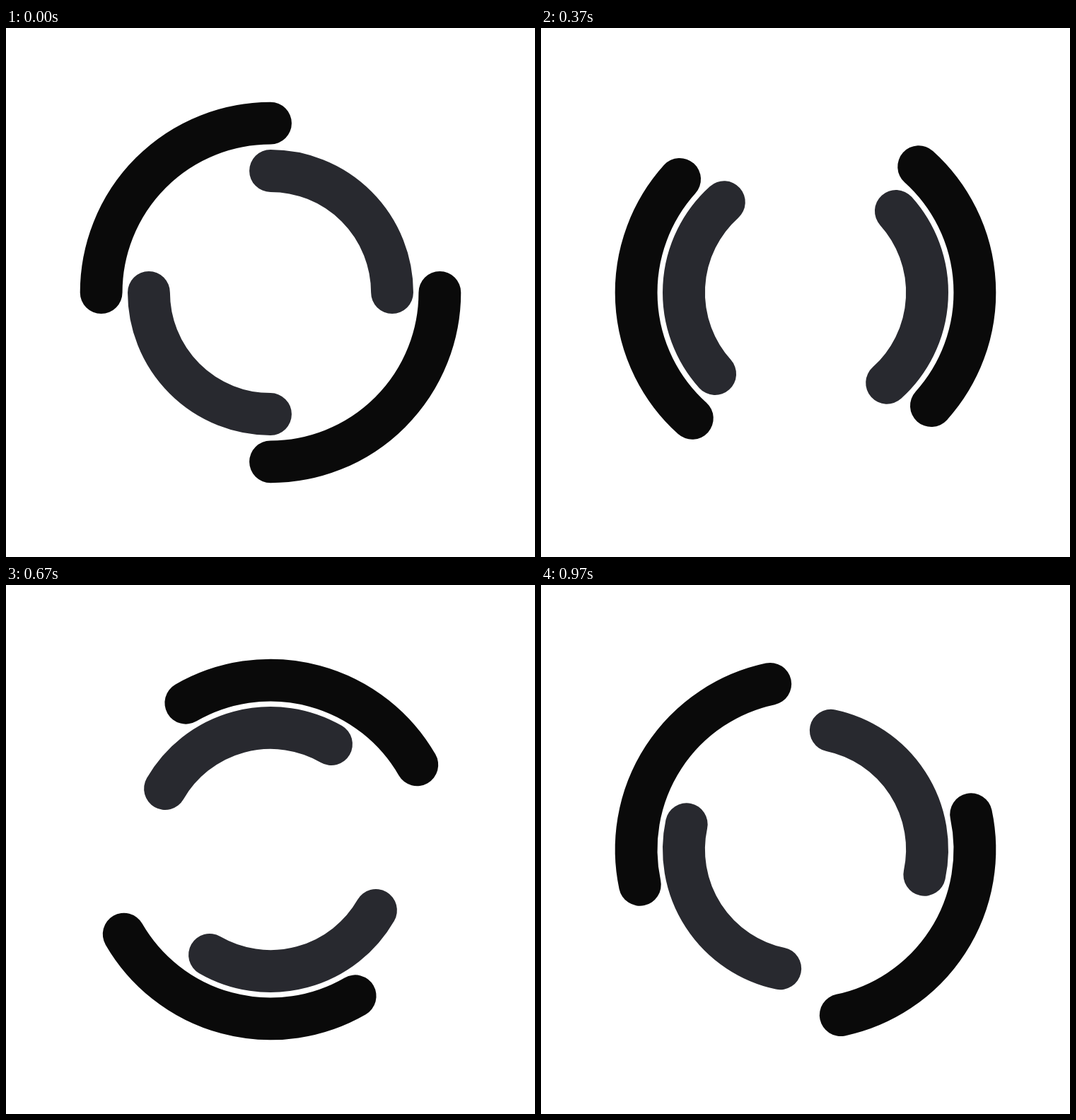
Animation, 748 px wide and 748 px high, one loop 1 s. Source, as an HTML page with a canvas:

```html
<!DOCTYPE html>
<html lang="en">
<head>
<meta charset="utf-8">
<title>Double ring spinner</title>
<style>
  html, body { margin: 0; width: 100%; height: 100%; overflow: hidden; background: #fff; }
  canvas { display: block; width: 748px; height: 748px; }
</style>
</head>
<body>
<canvas id="stage" width="748" height="748"></canvas>
<script>
const SIZE = 748, MID = SIZE / 2, LOOP = 1000, STEPS = 30;
const QUARTER = Math.PI / 2;
const ctx = document.getElementById('stage').getContext('2d');

// Two opposite quarter arcs, beginning at the given angle
function ring(radius, color, start) {
  ctx.strokeStyle = color;
  for (const from of [start, start + Math.PI]) {
    ctx.beginPath();
    ctx.arc(MID, MID, radius, from, from + QUARTER);
    ctx.stroke();
  }
}

// 30 steps per loop, each starting on a whole 10 ms tick
function stepAt(ms) {
  const tick = Math.floor((ms % LOOP) / 10);
  return Math.floor((tick + 0.5) * 0.3) % STEPS;
}

function draw(ms) {
  const turn = stepAt(ms) / STEPS * Math.PI * 2;
  ctx.fillStyle = '#fff';
  ctx.fillRect(0, 0, SIZE, SIZE);
  ctx.lineWidth = SIZE * 0.08;
  ctx.lineCap = 'round';
  ring(SIZE * 0.32, '#0a0a0a', turn);
  ring(SIZE * 0.23, '#28292f', QUARTER - turn);
}

const began = performance.now();
function loop() {
  draw(performance.now() - began);
  requestAnimationFrame(loop);
}
loop();
</script>
</body>
</html>
```
